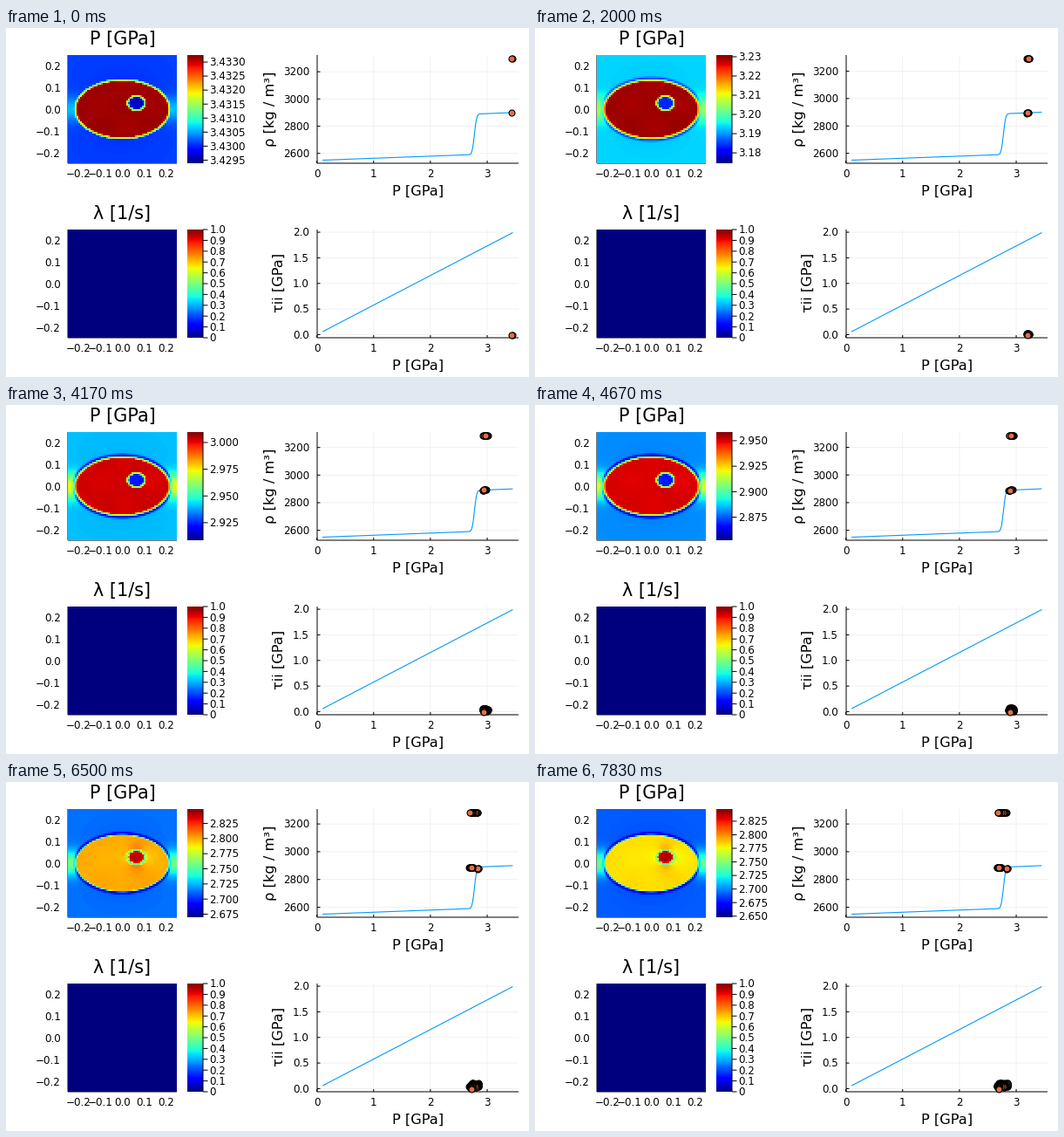
A matplotlib script for the animation above (8 s loop, 600 by 400 pixels).

```python
import math

import matplotlib.pyplot as plt
import numpy as np
from matplotlib.animation import FuncAnimation

W, H, DPI = 600, 400, 100
STEPS, LOOP, TICK_MS = 48, 8000, 50
PX = 72 / DPI                      # one pixel in points
TICK, GUIDE, TITLE = 11.85, 16.3, 20.74
BLUE, ORANGE, GRID = "#009afa", "#e36f47", "#eeeeee"

# pressure levels over the run, in GPa, and shape factors
KEYS = [0, 6, 12, 20, 28, 31, 34, 36, 39, 47]
LEVELS = {
    "low": [3.42939, 3.3030, 3.1746, 3.0022, 2.8524, 2.795, 2.737, 2.705, 2.670, 2.648],
    "high": [3.43325, 3.3324, 3.2309, 3.0952, 2.9585, 2.907, 2.856, 2.850, 2.8487, 2.8474],
    "matrix": [3.43013, 3.3121, 3.1937, 3.0402, 2.8810, 2.822, 2.763, 2.733, 2.713, 2.692],
    "grain": [3.43314, 3.3315, 3.2292, 3.0898, 2.9500, 2.899, 2.847, 2.818, 2.800, 2.782],
    "core": [3.42962, 3.3068, 3.1835, 3.0150, 2.8680, 2.842, 2.840, 2.839, 2.838, 2.838],
    "tip": [0.12, 0.18, 0.20, 0.25, 0.35, 0.33, 0.30, 0.28, 0.25, 0.25],
    "rim": [0, 0.3, 0.45, 0.55, 0.9, 0.93, 0.97, 0.97, 0.98, 0.98],
    "stress": [0, 0.01, 0.025, 0.045, 0.07, 0.08, 0.09, 0.095, 0.1, 0.11],
}

fig = plt.figure(figsize=(W / DPI, H / DPI), dpi=DPI, facecolor="white")
ax = fig.add_axes([0, 0, 1, 1])
ax.set_xlim(0, W)
ax.set_ylim(H, 0)
ax.set_autoscale_on(False)
ax.axis("off")


def text(x, y, s, size=TICK, ha="center", turn=0):
    """Level text has its capitals centred on y, turned text its length."""
    drop = 0 if turn else 0.365 * size
    return ax.text(x, y + drop, s, fontsize=size * PX, ha=ha, va="baseline",
                   rotation=turn, rotation_mode="anchor",
                   family="DejaVu Sans", color="black")


def line(xs, ys, color="black", width=1.0, z=2):
    return ax.plot(xs, ys, color=color, lw=width * PX, zorder=z,
                   solid_capstyle="butt", snap=False)[0]


def image(data, x0, x1, y0, y1):
    return ax.imshow(data, extent=(x0, x1, y1, y0), cmap="jet", vmin=0, vmax=1,
                     interpolation="nearest", aspect="auto", zorder=1)


def minus(v):
    return f"{v:.1f}".replace("-", "\u2212")


# ---- field geometry ----
N = 62
CELL = 0.5 / N
mid = -0.25 + (np.arange(N) + 0.5) * CELL
X, Y = np.meshgrid(mid, mid[::-1])


def ellipse_dist(cx, cy, a, b):
    """Approximate signed distance to an ellipse, in cells."""
    u, v = X - cx, Y - cy
    r = np.hypot(u / a, v / b) + 1e-9
    return (r - 1) * r / (np.hypot(u / a**2, v / b**2) + 1e-9) / CELL


def inside(d):
    """Share of the inner phase: a band of mixed cells along the edge."""
    return np.interp(d, [-0.75, -0.5, 0.5, 0.75], [1, 0.62, 0.35, 0])


D1 = ellipse_dist(0, 0, 0.216, 0.135)
D2 = ellipse_dist(0.063, 0.028, 0.040, 0.032)
IN1, IN2 = inside(D1), inside(D2)
RIM2 = np.exp(-((D2 - 0.1) / 0.6) ** 2)
TIP = np.exp(-(Y / 0.055) ** 2) * np.exp(-np.clip(0.216 - np.abs(X), 0, 1) / 0.03)
R2 = (X / 0.216) ** 2 + (Y / 0.135) ** 2
SHADE = -0.02 / np.maximum(R2, 1) ** 2 * (Y / 0.135) ** 2
U, V = X - 0.063, Y - 0.028
HALO = 0.036**2 * (V**2 - U**2) / np.maximum(U**2 + V**2, 0.036**2) ** 2
WAVE = 0.006 * np.sin(28 * X + 1) * np.cos(31 * Y - 0.6)
GRAIN = D1 < 0
CORE = D2 < -0.8
STRESS = np.where(CORE, 0.75 + 0.35 * np.sin(60 * U) * np.cos(70 * V),
                  np.where(GRAIN, 0.45 + 0.4 * np.abs(HALO) + 30 * WAVE,
                           0.8 * TIP + 0.5 * np.exp(-np.abs(D1) / 6)))
STRESS = np.clip(STRESS, 0, 1.1)


def state(step):
    return {k: np.interp(step, KEYS, v) for k, v in LEVELS.items()}


def pressure(step, s):
    span = s["high"] - s["low"]
    halo = np.interp(step, [0, 28, 34], [0, 0.02, 0.08])
    ring = np.interp(step, [29, 34], [0, 0.95])
    shift = np.interp(step, [28, 36], [1.1, 0.3])
    rim = s["rim"] * np.exp(-((D1 - shift) / 0.7) ** 2) * (1 - 0.6 * TIP)
    matrix = s["matrix"] + span * (s["tip"] * TIP + SHADE)
    grain = s["grain"] + span * (halo * HALO + WAVE)
    p = IN1 * grain + (1 - IN1) * matrix
    p += rim * (s["low"] + 0.03 * span - p)
    p = IN2 * (s["core"] + span * WAVE) + (1 - IN2) * p
    p += ring * RIM2 * (s["low"] + 0.42 * span - p)
    return np.clip(p, s["low"], s["high"])


def density_curve(p):
    x = np.array([0.5 * (1 + math.erf((q - 2.775) / 0.045)) for q in np.ravel(p)])
    return (1 - x) * (2548.5 + 15.5 * p) + x * (2842 + 16.8 * p)


# ---- left column ----
TOPS = (31, 231)
TALL = 124
ramp = np.linspace(1, 0, 256)[:, None]
heat, _ = [image(np.zeros((N, N)), 71, 196, y, y + TALL) for y in TOPS]
for y0, name in zip(TOPS, ("P [GPa]", "\u03bb [1/s]")):
    base = y0 + TALL
    text(133.5, y0 - 20, name, TITLE)
    line([71, 71], [y0, base], z=0)
    line([71, 196], [base, base], z=0)
    image(ramp, 208, 226, y0, base)
    line([226, 226], [y0, base])
    for v in (-0.2, -0.1, 0.0, 0.1, 0.2):
        text(63, y0 + 62.3 - 250 * v, minus(v), ha="right")
        text(133.3 + 250 * v, base + 12, minus(v))
for i in range(11):
    y = TOPS[1] + TALL * (1 - i / 10)
    line([226, 231.5], [y, y])
    text(233.5, y, f"{i / 10:.1f}" if i else "0", ha="left")
bar_ticks = [(line([226, 231.5], [0, 0]), text(233.5, 0, "", ha="left"))
             for _ in range(14)]

# ---- right column ----
LEFT, RIGHT = 357, 588


def px(p):
    return 356.6 + 65.15 * p


def tau_y(t):
    return TOPS[1] + (2.052 - t) * TALL / 2.112


for y0 in TOPS:
    base = y0 + TALL
    line([LEFT, LEFT], [y0, base])
    line([LEFT, RIGHT], [base, base])
    for v in range(4):
        x = px(v)
        if v:
            line([x, x], [y0, base], GRID, 0.8, 0)
        line([x, x], [base - 3, base])
        text(x, base + 12, str(v))
    text(472.5, base + 30.7, "P [GPa]", GUIDE)
text(308, 93, "\u03c1 [kg / m\u00b3]", GUIDE, turn=90)
text(318, 292, "\u03c4ii [GPa]", GUIDE, turn=90)

for t in (0, 0.5, 1, 1.5, 2):
    y = tau_y(t)
    line([LEFT, RIGHT], [y, y], GRID, 0.8, 0)
    line([LEFT, LEFT + 3.5], [y, y])
    text(348, y, f"{t:.1f}", ha="right")

p_line = np.linspace(0.1, 3.45, 200)
rho_line = density_curve(p_line)
line(px(p_line), tau_y(p_line * math.tan(math.pi / 6)), BLUE, 1.1, 3)
curve = line(px(p_line), p_line, BLUE, 1.1, 3)
rho_ticks = [(v, line([LEFT, RIGHT], [0, 0], GRID, 0.8, 0),
              line([LEFT, LEFT + 3.5], [0, 0]), text(348, 0, str(v), ha="right"))
             for v in (2600, 2800, 3000, 3200)]


def dots():
    return ax.plot([], [], "o", ms=7 * PX, mfc=ORANGE, mec="black",
                   mew=1.1 * PX, zorder=5)[0]


rho_dots, tau_dots = dots(), dots()


def place(marks, x, y):
    """Put one dot per half pixel, later cells on top."""
    spots = np.round(2 * np.column_stack([x.ravel(), y.ravel()])) / 2
    _, last = np.unique(spots[::-1], axis=0, return_index=True)
    spots = spots[::-1][np.sort(last)[::-1]]
    marks.set_data(spots[:, 0], spots[:, 1])


def tick_rule(span):
    """Tick spacing and number of decimals for a colour bar."""
    n = math.floor(math.log10(span))
    f = span / 10**n
    m, extra = (1, 0) if f > 5 else (0.5, 1) if f > 2.5 else (0.25, 2)
    return m * 10**n, extra - n


def draw_bar(lo, hi):
    gap, places = tick_rule(hi - lo)
    first = math.ceil(lo / gap)
    for i, (mark, label) in enumerate(bar_ticks):
        v = (first + i) * gap
        shown = v <= hi
        mark.set_visible(shown)
        label.set_visible(shown)
        if shown:
            y = TOPS[0] + TALL * (hi - v) / (hi - lo)
            mark.set_ydata([y, y])
            label.set_y(y + 0.365 * TICK)
            label.set_text(f"{v:.{places}f}")


def update(frame):
    # the picture holds for a sixth of a second, then jumps to the next step
    step = min(STEPS - 1, int((frame * TICK_MS + 33.4) * STEPS / LOOP))
    s = state(step)
    p = pressure(step, s)
    heat.set_data((p - s["low"]) / (s["high"] - s["low"]))
    draw_bar(s["low"], s["high"])

    rho = np.where(GRAIN, 3300 - 24 * (3.433 - p), 2900 - 14 * (3.433 - p))
    rho[CORE] = density_curve(p[CORE])
    top, bottom = rho.max(), rho_line[0]
    pad = 0.03 * (top - bottom)

    def rho_y(r):
        return TOPS[0] + TALL * (top + pad - r) / (top - bottom + 2 * pad)

    curve.set_ydata(rho_y(rho_line))
    for v, grid, mark, label in rho_ticks:
        y = rho_y(v)
        grid.set_ydata([y, y])
        mark.set_ydata([y, y])
        label.set_y(y + 0.365 * TICK)

    # cells run from the bottom row up
    xs = px(p[::-1])
    place(rho_dots, xs, rho_y(rho[::-1]))
    place(tau_dots, xs, tau_y(s["stress"] * STRESS[::-1]))
    return heat, curve, rho_dots, tau_dots


anim = FuncAnimation(fig, update, frames=LOOP // TICK_MS, interval=TICK_MS,
                     init_func=lambda: update(0), repeat=True, repeat_delay=0,
                     blit=False, cache_frame_data=False)
plt.show()
```
